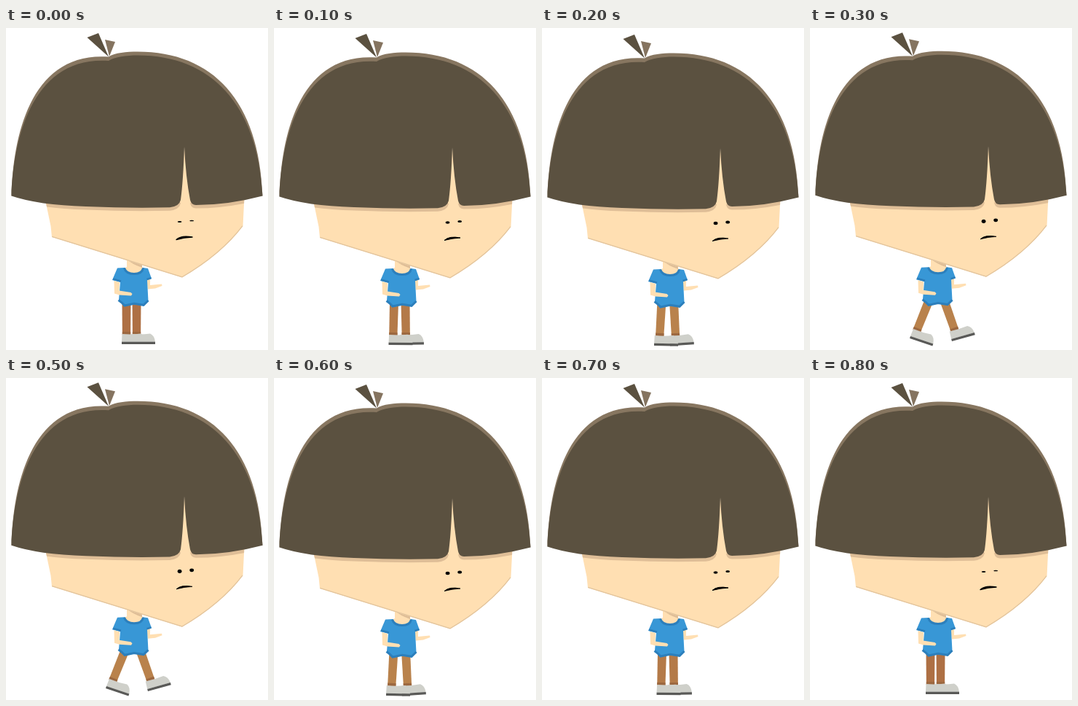
Recreate the animation shown at these times as an HTML page. Size 360 px wide and 442 px high, loop 900 ms.

```html
<!DOCTYPE html>
<html lang="en">
<head>
<meta charset="utf-8">
<title>Walking boy</title>
<style>
  html, body { margin: 0; width: 100%; height: 100%; overflow: hidden; background: #fff; }
  svg { display: block; width: 100vw; height: 100vh; animation: walk 900ms step-end infinite; }

  .body { transform: translateY(var(--bob)); }
  .eye { transform: scaleY(var(--open)); transform-box: fill-box; transform-origin: center; }
  .mouth { stroke-width: var(--lip); }
  .leg { fill: var(--pants); }
  .back.leg { transform: var(--back-leg); }
  .back.shoe { transform: var(--back-shoe); }
  .front.leg { transform: var(--front-leg); }
  .front.shoe { transform: var(--front-shoe); }

  /* Five poses, stepped there and back. */
  @keyframes walk {
    0%, 88.88%, 100% {
      --bob: 0px; --open: .35; --lip: 1.3px; --pants: #ae7044;
      --back-leg: translate(165.5px, 376px);
      --back-shoe: translate(159px, 434px);
      --front-leg: translate(179.5px, 376px);
      --front-shoe: translate(172px, 434px);
    }
    11.11%, 77.77% {
      --bob: 1px; --open: .65; --lip: 1px; --pants: #b47a48;
      --back-leg: translate(165px, 377px) rotate(1.5deg);
      --back-shoe: translate(157.5px, 435px) rotate(.5deg);
      --front-leg: translate(180.5px, 377px) rotate(-1deg);
      --front-shoe: translate(173px, 435px) rotate(-1deg);
    }
    22.22%, 66.66% {
      --bob: 2px; --open: .85; --lip: .8px; --pants: #b9824c;
      --back-leg: translate(164.3px, 378px) rotate(3.3deg);
      --back-shoe: translate(154px, 436px) rotate(1.2deg);
      --front-leg: translate(181.2px, 378px) rotate(-3deg);
      --front-shoe: translate(176px, 436.5px) rotate(-4deg);
    }
    33.33%, 55.55% {
      --bob: -.7px; --open: 1; --lip: .8px; --pants: #b9824c;
      --back-leg: translate(163.5px, 374px) rotate(22deg);
      --back-shoe: translate(137px, 426px) rotate(18.5deg);
      --front-leg: translate(184px, 373px) rotate(-19.5deg);
      --front-shoe: translate(195px, 430px) rotate(-15.5deg);
    }
    44.44% {
      --bob: -1.2px; --open: 1; --lip: .8px; --pants: #b9824c;
      --back-leg: translate(163.5px, 373.5px) rotate(25deg);
      --back-shoe: translate(134px, 424px) rotate(22deg);
      --front-leg: translate(184px, 372.5px) rotate(-22deg);
      --front-shoe: translate(198px, 429px) rotate(-18deg);
    }
  }
</style>
</head>
<body>
<svg viewBox="0 0 360 442">
  <defs>
    <g id="leg">
      <path d="M-6 0H6L5.6 45H-5.6Z"/>
      <path fill="#9c6840" d="M-5.7 41H5.7V45H-5.7Z"/>
    </g>
    <g id="shoe">
      <path fill="#cfd0ca" d="M.5-14Q14-13 26-14.5Q32-12 33-3H0Z"/>
      <path fill="#595957" d="M0-3.2H33V0H0Z"/>
    </g>
    <path id="hair" d="M7.500 230.500C10 152 36 38 141 45C150 39.500 165 37.500 181 37.500C282 37.500 346 105 352.500 230.500Q305 243 261 243Q254.500 243 253 236Q247 205 245 163Q243.500 210 240 236Q238 245 225 246.200Q170 247.500 110 245Q44 243 7.500 230.500Z"/>
    <clipPath id="face">
      <path d="M54 236L61.500 272L63 287L242 342.500Q296 311 325.500 272L327.500 232Z"/>
    </clipPath>
  </defs>

  <use class="front leg" href="#leg"/>
  <use class="back leg" href="#leg"/>
  <use class="front shoe" href="#shoe"/>
  <use class="back shoe" href="#shoe"/>

  <g class="body">
    <g fill="#ffdfb2">
      <path d="M193 345L198 344L198 353L214 351.500L214.500 354L205 357.500L195 358.500Z"/>
      <path d="M166 315H187V328L190 330L186 340H166L162 330L166 328Z"/>
    </g>
    <path fill="#dfbe97" d="M165 314L187 321V329Q173 324 165 317Z"/>

    <path fill="#3897d6" d="M163 329L153 329.500L146 346L157 349L155 373Q160 377 162 382L176 379L189 381L195.500 375L194 346L200 344L195 330L188 329Q187 338 176 338Q165 338 163 329Z"/>
    <g fill="none" stroke="#2c7fbc" stroke-width="3">
      <path d="M162.500 329.500Q165 337.500 176 337.500Q187 337.500 188.500 329.500"/>
      <path d="M154.500 373.500Q159 376.500 163 381L176 378.300L189 380.300L195.500 374"/>
      <path d="M147 344.500L158 347.500M193.500 345L199.500 343" stroke-width="2.500"/>
    </g>
    <path fill="#ffdfb2" d="M148.500 347L156 349L155.500 360.500L171.500 363L173.500 365L172 367.500L156 366.500L149 364.500Z"/>

    <g clip-path="url(#face)">
      <path fill="#ffdfb2" d="M50 230H330V345H50Z"/>
      <path fill="none" stroke="#e2c49d" stroke-width="2.500" d="M63 287L242 342.500Q296 311 325.500 272"/>
      <use href="#hair" y="4.500" fill="#dfbe97"/>
    </g>

    <ellipse class="eye" cx="238.600" cy="266" rx="2.900" ry="2.600"/>
    <ellipse class="eye" cx="255.200" cy="264.500" rx="2.900" ry="2.400"/>
    <path class="mouth" stroke="#000" stroke-linejoin="round" d="M234 290.500Q241 284 256 287Q245 287.500 234 290.500Z"/>

    <path fill="#5b5140" d="M111.500 13L127 7L141 39.500Z"/>
    <path fill="#857460" d="M136 16L150 19L142 39Z"/>
    <path fill="#877660" d="M7.500 230.500C10 145 35 32 141 39.500C150 34 165 32.500 181 32.500C284 32.500 348 100 352.500 230.500L340 225C320 100 250 60 181 50Q60 50 20 225Z"/>
    <path fill="#ffdfb2" d="M245 160L239 240H255Z"/>
    <use href="#hair" fill="#5b5140"/>
  </g>
</svg>
</body>
</html>
```
